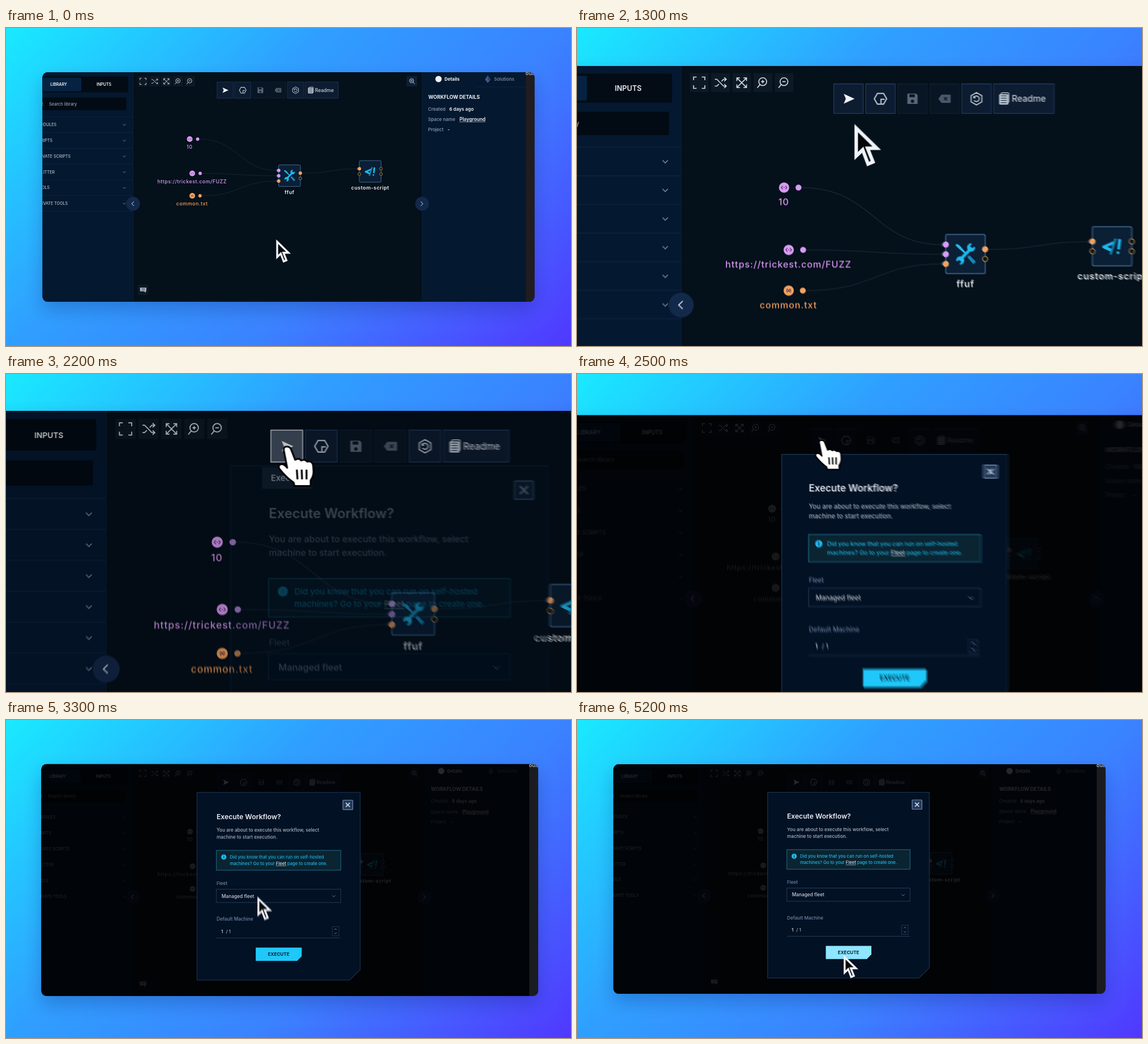
An HTML page with a canvas that plays this animation: 998 px wide and 561 px high, repeating every 5.3 s.

```html
<!DOCTYPE html>
<html lang="en">
<head>
<meta charset="utf-8">
<title>Execute workflow</title>
<style>
html, body { margin: 0; width: 100%; height: 100%; overflow: hidden; background: #2f9cff; }
canvas { display: block; width: 998px; height: 561px; }
</style>
</head>
<body>
<canvas id="stage" width="998" height="561"></canvas>
<script>
const W = 998, H = 561, LOOP = 5300, STEP = 100, EXPOSURE = 0.013;
const screen2d = document.getElementById('stage').getContext('2d');
const buffer = document.createElement('canvas');
buffer.width = W;
buffer.height = H;
const c = buffer.getContext('2d');

const PANEL = '#04182f', FIELD = '#020b14', RULE = '#12294a', MUTED = '#8fa0b6', WIRE = '#1a2733';
const PINK = '#d99bf5', ORANGE = '#f4a261', CYAN = '#1fb9ee', WHITE = '#f0f4f8';

// ---------- timing ----------
const spring = (t, w) => t <= 0 ? 0 : 1 - (1 + w * t) * Math.exp(-w * t);
const ramp = (t, a, b) => Math.min(1, Math.max(0, (t - a) / (b - a)));
const FOCUS = { x: 274, y: 91.4 };
const zoomAt = t => 1 + spring(t - 0.763, 5.8) - spring(t - 2.15, 5.8);

const START = { x: 477, y: 373 };
const MOVES = [
  { x: 387.8, y: 111.3, startX: 0.37, startY: 0.49, w: 5 },
  { x: 453, y: 379, startX: 2.76, startY: 2.86, w: 6 },
  { x: 471, y: 415, startX: 4.3, startY: 4.3, w: 7 }
];
function pointerAt(t) {
  let from = START, { x, y } = START;
  for (const m of MOVES) {
    x += (m.x - from.x) * spring(t - m.startX, m.w);
    y += (m.y - from.y) * spring(t - m.startY, m.w);
    from = m;
  }
  return { x, y };
}
const pressAt = t => ramp(t, 1.75, 1.9) - ramp(t, 2.1, 2.25);

// ---------- drawing helpers ----------
function box(x, y, x2, y2, fill, stroke, r = 0, lw = 0.8) {
  c.beginPath();
  c.roundRect(x, y, x2 - x, y2 - y, r);
  paint(fill, stroke, lw);
}
function paint(fill, stroke, lw = 1) {
  if (fill) { c.fillStyle = fill; c.fill(); }
  if (stroke) { c.strokeStyle = stroke; c.lineWidth = lw; c.stroke(); }
}
function poly(points, fill, stroke, lw) {
  c.beginPath();
  points.forEach(([x, y]) => c.lineTo(x, y));
  c.closePath();
  paint(fill, stroke, lw);
}
function dot(x, y, r, fill, stroke, lw) {
  c.beginPath();
  c.arc(x, y, r, 0, 7);
  paint(fill, stroke, lw);
}
function line(x, y, x2, y2, color, lw = 0.7) {
  c.beginPath();
  c.moveTo(x, y);
  c.lineTo(x2, y2);
  paint(null, color, lw);
}
function icon(x, y, d, stroke, lw = 1, fill) {
  c.save();
  c.translate(x, y);
  const p = new Path2D(d);
  if (fill) { c.fillStyle = fill; c.fill(p); }
  if (stroke) { c.strokeStyle = stroke; c.lineWidth = lw; c.stroke(p); }
  c.restore();
}
function text(s, x, y, size, color, weight = 500, align = 'left', gap = 0) {
  c.font = `${weight} ${size}px Inter, "Open Sans", sans-serif`;
  c.letterSpacing = gap + 'px';
  c.textAlign = align;
  c.textBaseline = 'alphabetic';
  c.fillStyle = color;
  c.fillText(s, x, y + size * 0.36);
  return c.measureText(s).width;
}
function underlined(s, x, y, size, color, weight) {
  const w = text(s, x, y, size, color, weight);
  line(x, y + size * 0.55, x + w, y + size * 0.55, color, 0.6);
  return w;
}

// ---------- scene parts ----------
function background() {
  const g = c.createLinearGradient(0, 0, 779.5, 779.5);
  g.addColorStop(0, '#19eaff');
  g.addColorStop(0.36, '#2f9fff');
  g.addColorStop(0.64, '#3a82ff');
  g.addColorStop(1, '#5038ff');
  c.fillStyle = g;
  c.fillRect(0, 0, W, H);
}

function sidebar() {
  box(64, 78, 224.5, 483, PANEL);
  line(224.5, 78, 224.5, 483, '#0e2440');
  box(50, 85.5, 215.5, 113.5, '#030b14', null, 2);
  box(50, 87.5, 133, 111.5, '#062242', null, 2);
  text('LIBRARY', 93, 99.7, 7, WHITE, 600, 'center');
  text('INPUTS', 173, 99.7, 7, WHITE, 600, 'center');
  box(50, 122.5, 212.5, 145, FIELD);
  icon(62, 134, 'M3-1a3 3 0 1 1-6 0 3 3 0 1 1 6 0M2 1.5l2 2', MUTED);
  text('Search library', 76, 134, 7.4, '#94a3b4');
  const rows = [['MODULES', 89], ['SCRIPTS', 82], ['PRIVATE SCRIPTS', 114],
    ['SPLITTER', 86], ['TOOLS', 77], ['PRIVATE TOOLS', 109]];
  rows.forEach(([name, right], i) => {
    const y = 170.7 + i * 27.8;
    line(64, y - 14, 224, y - 14, RULE);
    text(name, right, y, 7.1, '#b4c0cd', 500, 'right');
    icon(209, y, 'M-2.6-1.2L0 1.4 2.6-1.2', '#7488a0', 0.9);
  });
  line(64, 323.3, 224, 323.3, RULE);
}

function details() {
  box(735, 78, 918, 483, PANEL);
  line(735, 78, 735, 483, '#0e2440');
  line(827, 104, 918, 104, RULE);
  line(827, 78, 827, 104, '#0b213d');
  dot(764, 90, 5.6, WHITE);
  text('Details', 774.5, 90, 7.9, WHITE, 700);
  poly([[851, 83.5], [856, 91], [851, 97], [846, 91]], '#3d5c86');
  poly([[851, 83.5], [856, 91], [851, 93]], '#294569');
  text('Solutions', 862, 90, 8.1, '#8496ad');
  text('WORKFLOW DETAILS', 746, 121.7, 8.7, WHITE, 700);
  text('Created', 745.5, 143, 8.1, MUTED);
  text('6 days ago', 783, 143, 8.2, WHITE, 600);
  text('Space name', 745.5, 161, 8.1, MUTED);
  underlined('Playground', 801, 161, 8.4, WHITE, 600);
  text('Project', 745.5, 178.7, 8.1, MUTED);
  text('-', 780, 178.7, 8.2, WHITE, 600);
}

function smallTools() {
  const lens = 'M3.6-1a3.8 3.8 0 1 1-7.6 0 3.8 3.8 0 1 1 7.6 0M-3 2l-2.5 3';
  const shapes = [
    'M-5.5-2.5V-5.5H-2.5M2.5-5.5H5.5V-2.5M5.5 2.5V5.5H2.5M-2.5 5.5H-5.5V2.5',
    'M-5.5-3.3h2l6.5 6.6h2.5M-5.5 3.3h2l2-2M1-1.3l2-2h2.5M3.7-5.2l2 1.9-2 1.9M3.7 1.4l2 1.9-2 1.9',
    'M-4.5-4.5l9 9M4.5-4.5l-9 9M-4.7-1.7v-3h3M4.7-1.7v-3h-3M-4.7 1.7v3h3M4.7 1.7v3h-3',
    lens + 'M-1.8-1h3.2M-.2-2.6v3.2', lens + 'M-1.8-1h3.2'
  ];
  shapes.forEach((d, i) => {
    const x = 242 + i * 20.65;
    box(x - 9.2, 85, x + 9.2, 103.3, '#0d1925');
    icon(x, 94.2, d, '#d5dde5', 0.9);
  });
  box(707.5, 85, 726, 103.3, '#0d1f36');
  icon(717, 94, 'M3-1a3.6 3.6 0 1 1-7.2 0 3.6 3.6 0 1 1 7.2 0M2 1.5l3 3.4M-2.4-2h3.6M-2.4 0h3.6', '#b9c5d2', 1);
  box(233, 453, 251.5, 471, '#0d1925');
  icon(242.3, 461.5, 'M-5.5-3.5h11v6.5h-1v2.5l-3-2.5h-7z', null, 1, '#aab6c4');
  line(239.5, 459.8, 245.5, 459.8, '#0d1925', 0.7);
  line(239.5, 462.2, 245.5, 462.2, '#0d1925', 0.7);
}

function toolbar(hover) {
  [372.8, 403.9, 435, 466.1, 497.2].forEach((x, i) => {
    const off = i === 2 || i === 3;
    box(x, 95.3, x + 28.6, 124, off ? '#081623' : '#0d1c30', off ? '#0f2036' : '#233a60');
  });
  box(528.2, 95.3, 587, 124, '#0d1c30', '#233a60');
  if (hover) box(372.8, 95.3, 401.4, 124, `rgba(105,118,135,${0.6 * hover})`, `rgba(205,215,225,${hover})`);
  icon(387, 109.8, 'M-4.5-4.8L6 0-4.5 4.8-2.5 0z', null, 1, WHITE);
  const hex = 'M-3-5.2h6l3 5.2-3 5.2h-6l-3-5.2z';
  icon(418.2, 109.8, hex + 'M.5 4.5V.5h3.5', '#c7d1dc', 1.1);
  icon(449.3, 109.8, 'M-5-5H3.5L5-3.5V5H-5z', null, 1, '#59677a');
  box(446.3, 105.5, 451.5, 108.3, '#0a1826');
  dot(449.3, 112.2, 1.6, '#0a1826');
  icon(480.4, 109.8, 'M-6 0l3-4h9v8h-9z', null, 1, '#4a586a');
  icon(481.5, 109.8, 'M-1.5-1.5l3 3m0-3l-3 3', '#0a1826', 0.9);
  icon(511.5, 109.8, 'M0-6l5.2 3v6L0 6l-5.2-3v-6zM-2.3-1.5a2.7 2.7 0 1 1 0 3M-2.6-2.6v1.7h1.7', '#c7d1dc', 1);
  box(533.5, 105.3, 542.5, 115.5, '#b9c4d0', null, 1);
  box(535.5, 104, 543, 113.5, null, '#d5dde5', 1, 0.7);
  for (let y = 107; y < 114; y += 2.2) line(535, y, 541, y, '#223348', 0.7);
  text('Readme', 545.8, 109.8, 8.5, '#c9d2dc');
}

function wire(x, y, x2, y2) {
  const mid = (x + x2) / 2;
  c.beginPath();
  c.moveTo(x, y);
  c.bezierCurveTo(mid, y, mid, y2, x2 - 4, y2);
  paint(null, WIRE, 0.9);
  poly([[x2 - 4.5, y2 - 2], [x2 - 0.5, y2], [x2 - 4.5, y2 + 2]], '#2b425a');
}

function inputNode(x, y, gap, label, color, mark) {
  dot(x, y, 5, color);
  icon(x, y, mark, '#3b2544', 0.6);
  dot(x + gap, y, 2.9, color);
  text(label, x - 0.3, y + 14, 8.9, color, 500, 'center', 0.5);
}

function workNode(x, y, label, ports) {
  box(x - 19.2, y - 19, x + 19.2, y + 19, '#0b1f35', '#41688f', 1.5, 1);
  for (const [side, dy, color, filled] of ports) {
    dot(x + side * 19.1, y + dy, filled ? 3 : 2.5, filled ? color : '#08141f', filled ? null : color, 0.9);
  }
  text(label, x, y + 29, 8.9, WHITE, 600, 'center', 0.5);
}

function graph(dim) {
  const pink = dim ? '#a9a9ad' : PINK, orange = dim ? '#a9a9ad' : ORANGE;
  const ring = dim ? '#8d8d90' : '#b88b47';
  wire(341, 196, 482, 251.4);
  wire(346, 256.5, 482, 260.8);
  wire(345.5, 296, 482, 270);
  wire(523, 256, 624.5, 248.5);
  const code = 'M-1.2-1.6L-2.8 0l1.6 1.6M1.2-1.6L2.8 0 1.2 1.6M-.5 0h1';
  inputNode(324.5, 196, 14, '10', pink, code);
  inputNode(329, 256.5, 14, 'https://trickest.com/FUZZ', pink, code);
  inputNode(329, 296, 13.7, 'common.txt', orange, 'M-1.8-1.8l3.6 3.6m0-3.6l-3.6 3.6M-2-.8v1.6M2-.8v1.6');
  workNode(500.8, 260.5, 'ffuf', [[-1, -9.2, pink, 1], [-1, 0.2, pink, 1], [-1, 9.6, orange, 1],
    [1, -4.6, orange, 1], [1, 4.8, ring, 0]]);
  icon(501, 260.5, 'M-6 6L6-6', CYAN, 3);
  icon(501, 260.5, 'M9.2-7.2a4 4 0 1 1-3-3l-2 3 1.5 1.5zM-9.2 7.2a4 4 0 1 1 3 3l2-3-1.5-1.5z', null, 1, CYAN);
  icon(501, 260.5, 'M-10-8.5l1.5-1.5 3 2 5.5 6.5-1 1-6.5-5.5z', null, 1, CYAN);
  icon(501, 260.5, 'M1.5 3l2-2L10 7.5 7.5 10z', null, 1, '#1787b8');
  workNode(643.3, 253, 'custom-script', [[-1, -4.7, orange, 1], [-1, 4.8, ring, 0],
    [1, -4.7, ring, 0], [1, 4.8, ring, 0]]);
  icon(643.3, 253, 'M2.5-5.5V-2.5L-4.5.6 0 2.6-1 5.4-9.5 1.5V-.2z', null, 1, CYAN);
  icon(643.3, 253, 'M4.6-7.5L-.4 8H-2.6L2.4-7.5z', null, 1, '#1787b8');
  icon(643.3, 253, 'M6-7h3L7.7 3H5zM4.7 5h2.5l-.5 2.5H4.2z', null, 1, CYAN);
}

function handles() {
  for (const [x, s] of [[224.5, 1], [735, -1]]) {
    dot(x, 310, 12.2, '#13294a');
    icon(x - 0.5, 310, `M${2 * s}-3.8L${-2 * s} 0 ${2 * s} 3.8`, '#d5dfeb', 1);
  }
}

function tooltip(alpha) {
  c.save();
  c.globalAlpha = alpha;
  box(364.7, 128.5, 410, 148, '#182431');
  text('Execute', 387.3, 138.2, 7.6, '#c5ced8', 500, 'center');
  c.restore();
}

function modal(t, pointer) {
  poly([[336.7, 127.5], [622.3, 127.5], [622.3, 437], [604, 455.3], [336.7, 455.3]], '#031124', '#1e3957', 1);
  box(592, 141, 609.3, 157.5, '#243a58', '#6f8bb0', 1, 1.2);
  icon(600.6, 149.2, 'M-3.6-3.6l7.2 7.2m0-7.2l-7.2 7.2', '#c6d6ea', 1.7);
  text('Execute Workflow?', 371, 170, 12.1, '#e9eef4', 600);
  text('You are about to execute this workflow, select', 371, 193.2, 8.2, '#aab6c4');
  text('machine to start execution.', 371, 205.4, 8.2, '#aab6c4');

  box(370.7, 228.7, 588.3, 263.3, '#0a2431', '#1f6d86', 0, 1);
  dot(383.6, 240.3, 4.6, '#1fb9ee');
  text('i', 383.6, 240.3, 7, '#05233a', 700, 'center');
  text('Did you know that you can run on self-hosted', 394, 240.3, 7.6, CYAN);
  let x = 394 + text('machines? Go to your ', 394, 251.5, 7.6, CYAN);
  x += underlined('Fleet', x, 251.5, 7.6, '#d5e4ee', 500);
  text(' page to create one.', x, 251.5, 7.6, CYAN);

  text('Fleet', 371, 286.3, 8, '#6f87a6');
  box(370.7, 296.5, 588.3, 319.8, '#031124', '#253b55', 0, 1);
  text('Managed fleet', 379.7, 308.5, 8.3, '#c8d1dc');
  icon(576, 308.5, 'M-2.8-1.2L0 1.6 2.8-1.2', '#6f87a6', 0.9);
  text('Default Machine', 371, 348.6, 8.2, '#6f87a6');
  text('1', 379, 370, 8, '#dfe6ee');
  text('/ 1', 387.3, 370, 8, '#a5b2c1');
  if (t > 3.85 && t < 4.45) line(382.8, 365, 382.8, 375, WHITE, 0.9);
  line(371, 381.6, 588, 381.6, '#2b425e', 0.9);
  box(573.3, 362, 585, 378, null, '#2b425e', 0, 0.8);
  icon(579.2, 370, 'M-2-2.6l2-2 2 2M-2 2.6l2 2 2-2', '#8ba0ba', 0.8);

  const hover = pointer.y > 398.5 && pointer.x > 439.5;
  poly([[439.5, 398.5], [520, 398.5], [520, 413.5], [512, 421.7], [439.5, 421.7]], hover ? '#8fe6ff' : '#1fc8f8');
  text('EXECUTE', 479.6, 410, 8, '#05233a', 700, 'center');
}

// ---------- pointers ----------
function arrow() {
  c.lineJoin = 'miter';
  poly([[2, 4], [2, 31], [8.3, 25], [13.5, 38.8], [18.3, 36.8], [13, 23.5], [22, 23.5]], '#05070a', WHITE, 3.4);
}
function hand() {
  c.lineJoin = 'round';
  const d = 'M-3.2 1.4Q-3.6-1.6-.6-1.6 2-1.6 3 1.2L6.2 9.4q3-2 5 .6 3-1.6 5 .9 3.8-1 4.8 2.8L21.4 19q0 4-2.4 7.4V31H5.6L5 28.2Q-1.2 24-7 16.6q-1.2-3 1.6-3.6 2.6-.2 5 3z';
  icon(0, 0, d, '#000', 1.4, '#fff');
  icon(0, 0, 'M7.6 17.5l.5 8M11.6 17.5l.3 8M15.6 17.5v8', '#000', 1.5);
}
function beam() {
  const d = 'M-8-18Q0-18.5 0-13 0-18.5 8-18M0-13V13M-8 18Q0 18.5 0 13 0 18.5 8 18M-5 5H5';
  icon(0, 0, d, '#fff', 5.4);
  icon(0, 0, d, '#000', 2.2);
}

function scene(t) {
  const zoom = zoomAt(t), pointer = pointerAt(t);
  const onPlay = pointer.x < 401.4 && pointer.y < 124;
  const shown = ramp(t, 2.15, 2.35);
  const hover = onPlay && t < 2.3 ? ramp(t, 1.2, 1.5) : 0;

  c.setTransform(1, 0, 0, 1, 0, 0);
  background();
  c.setTransform(zoom, 0, 0, zoom, FOCUS.x * (1 - zoom), FOCUS.y * (1 - zoom));
  c.save();
  c.shadowColor = 'rgba(10,20,90,0.24)';
  c.shadowBlur = 32;
  c.shadowOffsetY = 14;
  box(64.5, 78, 933.5, 483, '#04101a', null, 9);
  c.restore();

  c.save();
  c.beginPath();
  c.roundRect(64.5, 78, 869, 405, 9);
  c.clip();
  box(224, 78, 736, 483, '#04101a');
  line(224, 481, 736, 481, '#0e2030');
  sidebar();
  details();
  smallTools();
  toolbar(hover);
  graph(shown > 0.5);
  handles();
  if (hover) tooltip(hover);
  if (shown) {
    c.globalAlpha = shown;
    box(64, 78, 918, 483, 'rgba(0,0,2,0.84)');
    modal(t, pointer);
    c.globalAlpha = 1;
  }
  box(918, 78, 934, 483, shown ? '#1b1c20' : '#211c1f');
  text('oua', 917.5, 80, 9, '#c4c6ca');
  c.restore();

  c.save();
  c.translate(pointer.x, pointer.y);
  if (onPlay) {
    const size = 1.13 - 0.13 * pressAt(t);
    c.scale(size, size);
    hand();
  } else if (pointer.y > 358 && pointer.y < 388 && t > 3) beam();
  else arrow();
  c.restore();
}

// Averages a short exposure so that fast movement smears.
function render(t) {
  const a = Math.max(0, t - EXPOSURE / 2), b = t + EXPOSURE / 2;
  const pa = pointerAt(a), pb = pointerAt(b);
  const travel = Math.hypot(pa.x - pb.x, pa.y - pb.y) + Math.abs(zoomAt(a) - zoomAt(b)) * 500;
  const samples = travel < 0.7 ? 1 : Math.min(8, 2 + Math.ceil(travel));
  for (let i = 0; i < samples; i++) {
    scene(samples === 1 ? t : a + (b - a) * i / (samples - 1));
    screen2d.globalAlpha = 1 / (i + 1);
    screen2d.drawImage(buffer, 0, 0);
  }
}

let last = -1;
const origin = performance.now();
function tick() {
  const now = Math.max(0, performance.now() - origin) % LOOP;
  const step = Math.floor(now / STEP);
  if (step !== last) {
    last = step;
    render(step * STEP / 1000);
  }
  requestAnimationFrame(tick);
}
tick();
</script>
</body>
</html>
```
